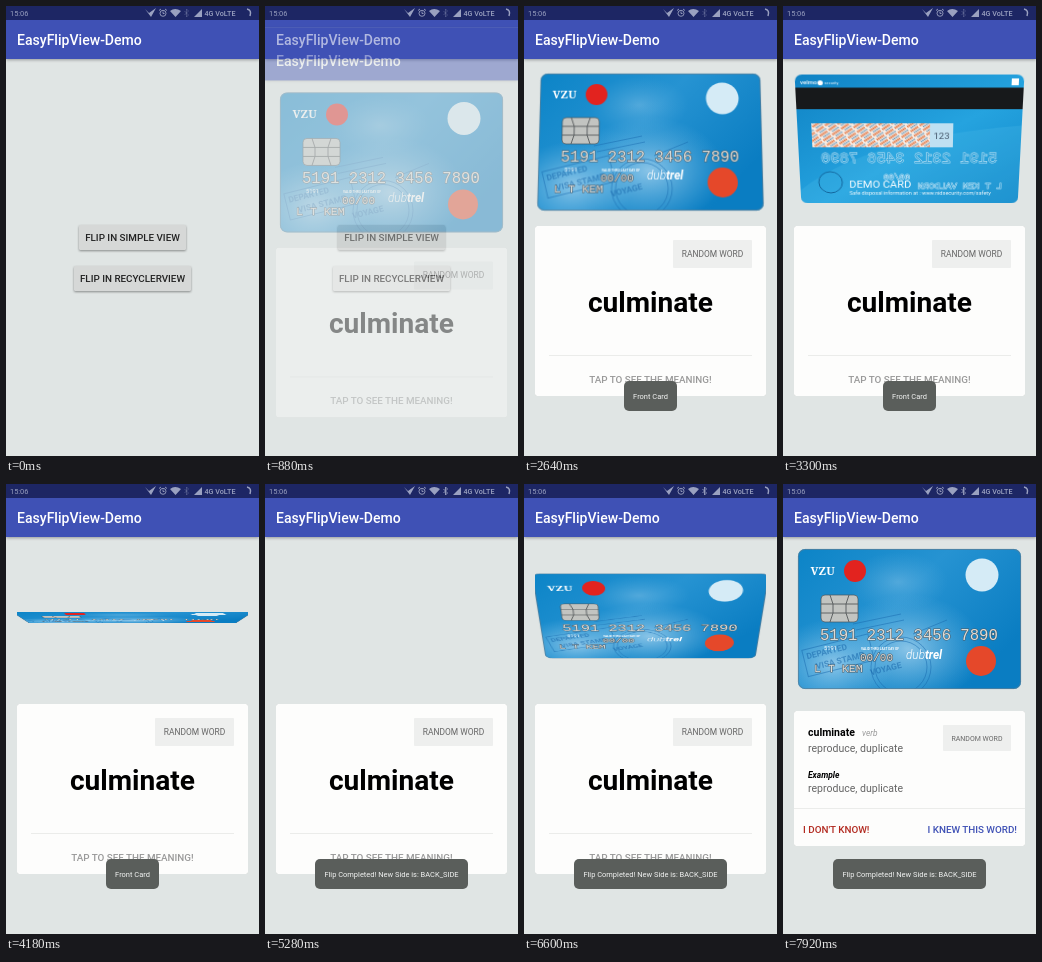
An HTML page for the animation above (8 s loop, 253 by 450 pixels).

```html
<!DOCTYPE html>
<html lang="en">
<head>
<meta charset="utf-8">
<title>Flip view demo</title>
<style>
  html, body { margin: 0; width: 100%; height: 100%; overflow: hidden; background: #e0e5e4; }
  #stage { position: relative; width: 253px; height: 450px; overflow: hidden; }
  .layer, .view, #stage svg { position: absolute; left: 0; top: 0; width: 253px; height: 450px; }
  .layer { background: #e0e5e4; }
  .bar { position: absolute; top: 0; width: 242px; height: 39px; padding: 14px 0 0 11px; background: #3f51b5;
    color: #fff; font: 500 14.05px/40px Roboto, sans-serif; box-shadow: 0 1px 3px #0005; }
  text { font-family: Roboto, sans-serif; white-space: pre; }
  .mid { text-anchor: middle; }
  .b { font-size: 9.84px; font-weight: 500; }
  .raised { filter: drop-shadow(0 1px 1px #0006); }
  .soft { filter: drop-shadow(0 .5px .7px #0003); }
  .emboss { font: 15.6px "Liberation Mono", monospace; fill: #dcdcd8; stroke: #4c5860; stroke-width: 1; paint-order: stroke; }
  .ghost { fill: #3aa5da; stroke: #d8f0fb; stroke-width: .9; }
  .credit { transform-origin: 126.5px 134px; }
  .word { transform-origin: 126.5px 305px; }
</style>
</head>
<body>
<div id="stage">
  <div class="layer">
    <div class="bar">EasyFlipView-Demo</div>
    <svg>
      <defs>
        <linearGradient id="blue" x2="1" y2=".6">
          <stop offset="0" stop-color="#0c84c7"/><stop offset=".5" stop-color="#2693d2"/><stop offset="1" stop-color="#0a7dc2"/>
        </linearGradient>
        <radialGradient id="glow">
          <stop offset="0" stop-color="#a4d2ee" stop-opacity=".8"/><stop offset="1" stop-color="#6fb9e3" stop-opacity="0"/>
        </radialGradient>
        <linearGradient id="cyan" x2="1" y2="1">
          <stop offset="0" stop-color="#0f82c4"/><stop offset=".55" stop-color="#25a3df"/><stop offset="1" stop-color="#0f86c8"/>
        </linearGradient>
        <clipPath id="edge"><rect x="15" y="65" width="223" height="140" rx="7"/></clipPath>
        <pattern id="hatch" width="11" height="6" patternUnits="userSpaceOnUse" patternTransform="rotate(-35)">
          <rect width="11" height="6" fill="#f6ece4"/>
          <path d="M0 1.500h9" stroke="#e2703a" stroke-width="1.900" stroke-dasharray="1.500 .4"/>
          <path d="M2 4.500h8" stroke="#5f93b8" stroke-width="1.600" stroke-dasharray="1.300 .5"/>
        </pattern>
      </defs>
      <rect id="press" class="raised" x="73" y="219" width="107" height="25" rx="1.5" fill="#d6d8d7"/>
      <rect class="raised" x="68" y="260" width="117" height="25" rx="1.5" fill="#d6d8d7"/>
      <g class="b mid" fill="#222">
        <text x="126.5" y="235">FLIP IN SIMPLE VIEW</text>
        <text x="126.5" y="276">FLIP IN RECYCLERVIEW</text>
      </g>
    </svg>
  </div>

  <div class="layer" id="detail">
    <div class="bar">EasyFlipView-Demo</div>

    <!-- the tilted card is cut off at the sides of its view -->
    <div class="view" style="clip-path: inset(54px 11px 230px)">
      <svg class="credit">
        <g clip-path="url(#edge)">
          <rect x="15" y="65" width="223" height="140" fill="url(#blue)"/>
          <ellipse cx="125" cy="165" rx="75" ry="55" fill="url(#glow)"/>
          <ellipse cx="50" cy="180" rx="60" ry="45" fill="url(#glow)"/>
          <ellipse cx="115" cy="98" rx="50" ry="30" fill="url(#glow)" opacity=".45"/>
          <g fill="none" stroke="#1668ad" stroke-opacity=".5">
            <circle cx="118" cy="183" r="30"/><circle cx="118" cy="183" r="26"/>
            <rect x="21" y="158" width="68" height="27" transform="rotate(-14 54 171)"/>
            <path d="M70 140l48-10M73 146l48-10M130 150l34-14"/>
          </g>
          <g fill="#1260a6" opacity=".5" font-weight="700" font-size="8.5" transform="rotate(-14 54 171)">
            <text x="24" y="168">DEPARTED</text><text x="31" y="180">VISA STAMP</text><text x="82" y="199">VOYAGE</text>
          </g>
        </g>
        <rect x="15.4" y="65.4" width="222.2" height="139.2" rx="7" fill="none" stroke="#5a7f98" stroke-width=".8"/>
        <text x="27.5" y="91" fill="#fff" font-weight="700" font-size="11.5" style="font-family:'Noto Serif',serif">VZU</text>
        <circle cx="72" cy="87" r="11" fill="#e2231f"/>
        <circle cx="199" cy="91" r="16.5" fill="#d5ebf6"/>
        <rect x="38" y="111" width="37" height="27" rx="4" fill="#c2c4c1" stroke="#47545c" stroke-width=".7"/>
        <path d="M38 120h12v9H38M75 120H63v9h12M50 120l-3-9M63 120l3-9M50 129l-3 9M63 129l3 9M50 120h13M50 129h13" fill="none" stroke="#54585a" stroke-width=".9"/>
        <text class="emboss" x="37" y="156">5191 2312 3456 7890</text>
        <g fill="#fff">
          <text x="41" y="166" font-size="5.8">5191</text>
          <text x="78" y="166" font-size="3.2" font-weight="700">VALID THRU LAST DAY OF</text>
          <text x="123" y="174.5" font-size="11.8" font-style="italic" font-weight="300">dub<tspan font-weight="700">trel</tspan></text>
        </g>
        <text class="emboss" x="77" y="176.5" style="font-size:11px">00/00</text>
        <text class="emboss" x="31" y="187.5" style="font-size:11.6px">L T KEM</text>
        <circle cx="198" cy="177" r="15" fill="#e5482a"/>
      </svg>

      <svg class="credit">
        <g clip-path="url(#edge)">
          <rect x="15" y="65" width="223" height="140" fill="url(#cyan)"/>
          <path d="M15 190q70-60 230-72v90H15z" fill="#5cc0ea" opacity=".2"/>
          <rect x="15" y="78.500" width="223" height="22.500" fill="#17191b"/>
        </g>
        <g fill="#fff">
          <text x="20" y="75.5" font-size="6" font-weight="500">velmo</text>
          <circle cx="39.5" cy="73.5" r="2.6"/>
          <text x="43.5" y="75.3" font-size="4">security</text>
          <rect x="226" y="69" width="7" height="7"/>
          <text x="65" y="187" font-size="11.3">DEMO CARD</text>
          <text x="65" y="195.3" font-size="5.6">Safe disposal information at : www.nidsecurity.com/safety</text>
        </g>
        <rect x="29" y="116" width="118" height="26" fill="url(#hatch)"/>
        <rect x="147" y="116" width="23" height="26" fill="#bfe0f2"/>
        <text class="mid" x="158.5" y="133" font-size="9.5" fill="#44566a">123</text>
        <g transform="matrix(-1 0 0 1 253 0)">
          <text class="emboss ghost" x="38" y="159">5191 2312 3456 7890</text>
          <text class="emboss ghost" x="126" y="178" style="font-size:9px">00/00</text>
          <text class="emboss ghost" x="32" y="188" style="font-size:9.6px">L T KEM VALDORN</text>
        </g>
        <circle cx="46" cy="181" r="12" fill="none" stroke="#12659c"/>
      </svg>
    </div>

    <div class="view" style="clip-path: inset(217px 9px 57px)">
      <svg class="word">
        <rect class="soft" x="11" y="220" width="231" height="170" rx="2.5" fill="#fdfdfc"/>
        <rect x="149" y="234" width="79" height="28" rx="1" fill="#eeefee"/>
        <path d="M25 349.5H228" stroke="#ebecea"/>
        <g class="mid">
          <text x="188.5" y="251" font-size="8.43" fill="#666">RANDOM WORD</text>
          <text x="126.5" y="306" font-size="28.1" font-weight="700">culminate</text>
          <text class="b" x="126.5" y="377" fill="#999">TAP TO SEE THE MEANING!</text>
        </g>
      </svg>

      <svg class="word">
        <rect class="soft" x="11" y="227" width="231" height="135" rx="2.5" fill="#fdfdfc"/>
        <rect x="160" y="241" width="68" height="26" rx="1" fill="#eeefee"/>
        <text class="mid" x="194" y="257" font-size="7" fill="#666">RANDOM WORD</text>
        <text x="25" y="252" font-size="10.54" font-weight="700">culminate</text>
        <text x="79" y="251.5" font-size="8.4" font-style="italic" fill="#999">verb</text>
        <g font-size="10.54" fill="#666">
          <text x="25" y="268">reproduce, duplicate</text>
          <text x="25" y="307.5">reproduce, duplicate</text>
        </g>
        <text x="25" y="294" font-size="8.43" font-weight="700" font-style="italic">Example</text>
        <path d="M11 324.5H242" stroke="#ebecea"/>
        <text class="b" x="20" y="349" fill="#b22a20">I DON'T KNOW!</text>
        <text class="b" x="234" y="349" fill="#3f51b5" text-anchor="end">I KNEW THIS WORD!</text>
      </svg>
    </div>
  </div>

  <svg>
    <rect width="253" height="14" fill="#1d2664"/>
    <g fill="#9aa1c0" font-size="7.4">
      <text x="4" y="10">15:06</text>
      <text x="198.5" y="10" font-weight="500" font-size="7.2">4G VoLTE</text>
      <path d="M139 3l4 4 7-5-5 9zM164 5q5-4 11 0l-5.500 6zM196 3v8h-8z"/>
      <g fill="none" stroke="#9aa1c0" stroke-width=".9">
        <circle cx="157" cy="7.300" r="3"/>
        <path d="M157 5.500v2h1.500M153 4.500l2-1.500M161 4.500l-2-1.500"/>
        <path id="tooth" d="M178.500 5l4 4-2 2V3l2 2-4 4"/>
        <path d="M241 3q5 1 3 7" stroke-width="1.500"/>
      </g>
    </g>
    <g id="toast">
      <rect y="375" height="30" rx="5" fill="#5a5e5b"/>
      <text class="mid" x="126.5" y="393" font-size="7.48" fill="#f4f5f4"></text>
    </g>
  </svg>
</div>

<script>
const LOOP = 8000, STEP = 220;
const $ = id => document.getElementById(id);
const credit = document.querySelectorAll('.credit');
const word = document.querySelectorAll('.word');
const clamp = x => Math.min(1, Math.max(0, x));
const ease = x => (1 - Math.cos(Math.PI * x)) / 2;

// Each start turns the card over; the visible face swaps at the half way point.
function flip(t, faces, axis, starts, dur) {
  let side = 0, angle = 0;
  starts.forEach((start, i) => {
    if (t < start) return;
    const p = ease(clamp((t - start) / dur)), past = p >= .5;
    side = (i + past) % 2;
    angle = (p - past) * 180;
  });
  faces.forEach((face, i) => {
    face.style.visibility = i === side ? 'inherit' : 'hidden';
    face.style.transform = angle ? `perspective(900px) rotate${axis}(${angle}deg)` : 'none';
  });
}

function showToast(t) {
  const first = t < 4730, start = first ? 2400 : 4730;
  const fadeIn = clamp((t - start) / 100), fadeOut = first ? clamp((4690 - t) / 150) : 1;
  const width = first ? 53 : 153;
  const [box, label] = $('toast').children;
  box.setAttribute('x', 126.5 - width / 2);
  box.setAttribute('width', width);
  label.textContent = first ? 'Front Card' : 'Flip Completed! New Side is: BACK_SIDE';
  $('toast').style.opacity = fadeIn * fadeOut;
}

function draw(now) {
  const t = Math.floor(now % LOOP / STEP) * STEP;
  $('press').setAttribute('fill', t >= 440 ? '#c3c6c5' : '#d6d8d7');

  const open = 1 - (1 - clamp((t - 800) / 350)) ** 2;
  $('detail').style.visibility = open ? 'visible' : 'hidden';
  $('detail').style.opacity = open;
  $('detail').style.transform = open < 1 ? `translateY(${36 * (1 - open)}px)` : 'none';

  flip(t, credit, 'X', [2456, 3612, 4729, 5901], 1100);
  flip(t, word, 'Y', [7030], 400);
  $('tooth').style.opacity = t < 4400 ? .35 : 1;
  showToast(t);
  requestAnimationFrame(() => draw(performance.now()));
}
draw(performance.now());
</script>
</body>
</html>
```
